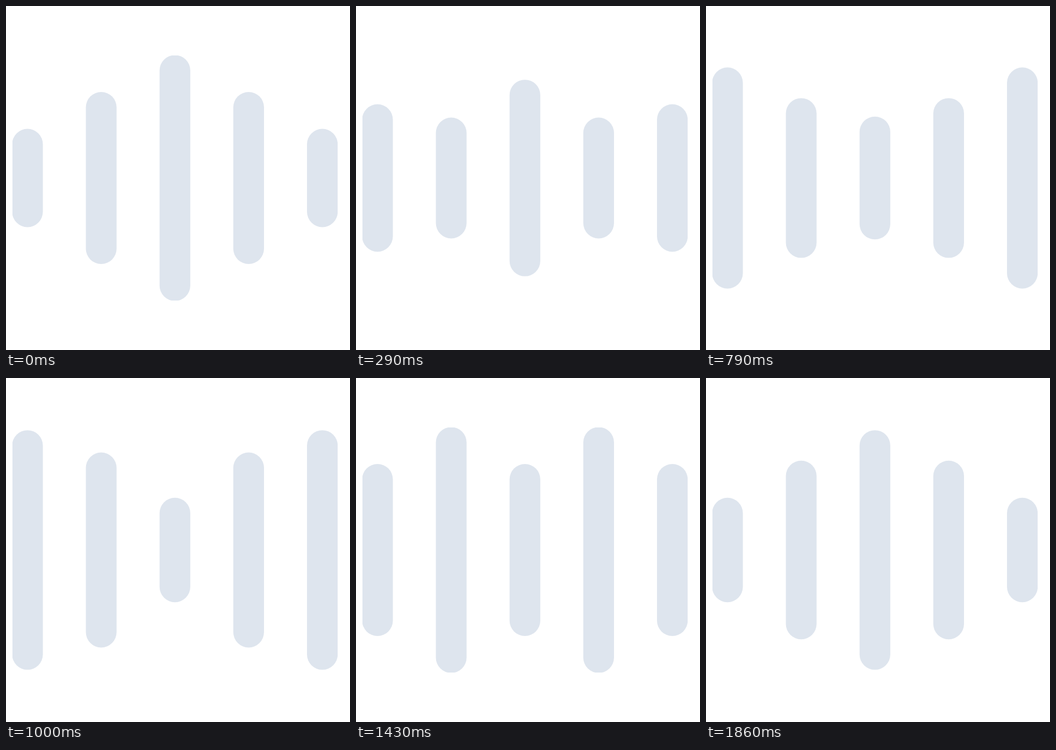
An HTML page with a canvas that plays this animation: 640 px wide and 640 px high, repeating every 1.93 s.

```html
<!DOCTYPE html>
<html lang="en">
<head>
<meta charset="utf-8">
<title>Equalizer bars</title>
<style>
  html, body { margin: 0; width: 100%; height: 100%; overflow: hidden; background: #fff; }
  canvas { display: block; width: 640px; height: 640px; }
</style>
</head>
<body>
<canvas id="stage" width="640" height="640"></canvas>
<script>
const ctx = document.getElementById('stage').getContext('2d');
const LOOP = 1930, FPS = 14, RATE = 25, BEATS = 48;
const UNIT = 640 / 112;            // layout grid
const WIDTH = 10 * UNIT, MID = 28 * UNIT, SWING = 12 * UNIT;
const LOW = MID - SWING, HIGH = MID + SWING;

const lerp = (a, b, u) => a + (b - a) * u;

// Time is shown in steps of 1/14 s, each sampling a 25 fps motion.
function beatAt(ms) {
  const t = ms % LOOP;
  const start = n => 10 * Math.round(n * 100 / FPS);
  let step = 0;
  while (step < 26 && start(step + 1) <= t) step++;
  return Math.min(BEATS - 1, Math.floor((step + 0.5) * RATE / FPS));
}

// Half heights of the bars
const outer = k => lerp(LOW, HIGH, 1 - Math.abs(k - 24) / 24);
const center = k => LOW + HIGH - outer(k);

function inner(k) {
  if (k >= 12 && k < 24) return lerp(LOW, 31 * UNIT, (k - 12) / 12);
  if (k >= 24 && k < 36) return lerp(31 * UNIT, HIGH, (k - 24) / 12);
  const u = (k >= 36 ? k - BEATS : k) / 12;
  return MID - SWING * (1.075 * u - 0.075 * u ** 3);
}

function bar(i, half) {
  ctx.beginPath();
  ctx.roundRect((2 + 24 * i) * UNIT, 320 - half, WIDTH, 2 * half, WIDTH / 2);
  ctx.fill();
}

function draw(ms) {
  const k = beatAt(ms);
  ctx.fillStyle = '#fff';
  ctx.fillRect(0, 0, 640, 640);
  ctx.save();
  ctx.beginPath();
  ctx.rect(12, 92, 605, 456);
  ctx.clip();
  ctx.fillStyle = '#dee5ee';
  [outer, inner, center, inner, outer].forEach((size, i) => bar(i, size(k)));
  ctx.restore();
}

const begin = performance.now();
function tick(now) {
  draw(Math.max(0, now - begin));
  requestAnimationFrame(tick);
}
draw(0);
requestAnimationFrame(tick);
</script>
</body>
</html>
```
